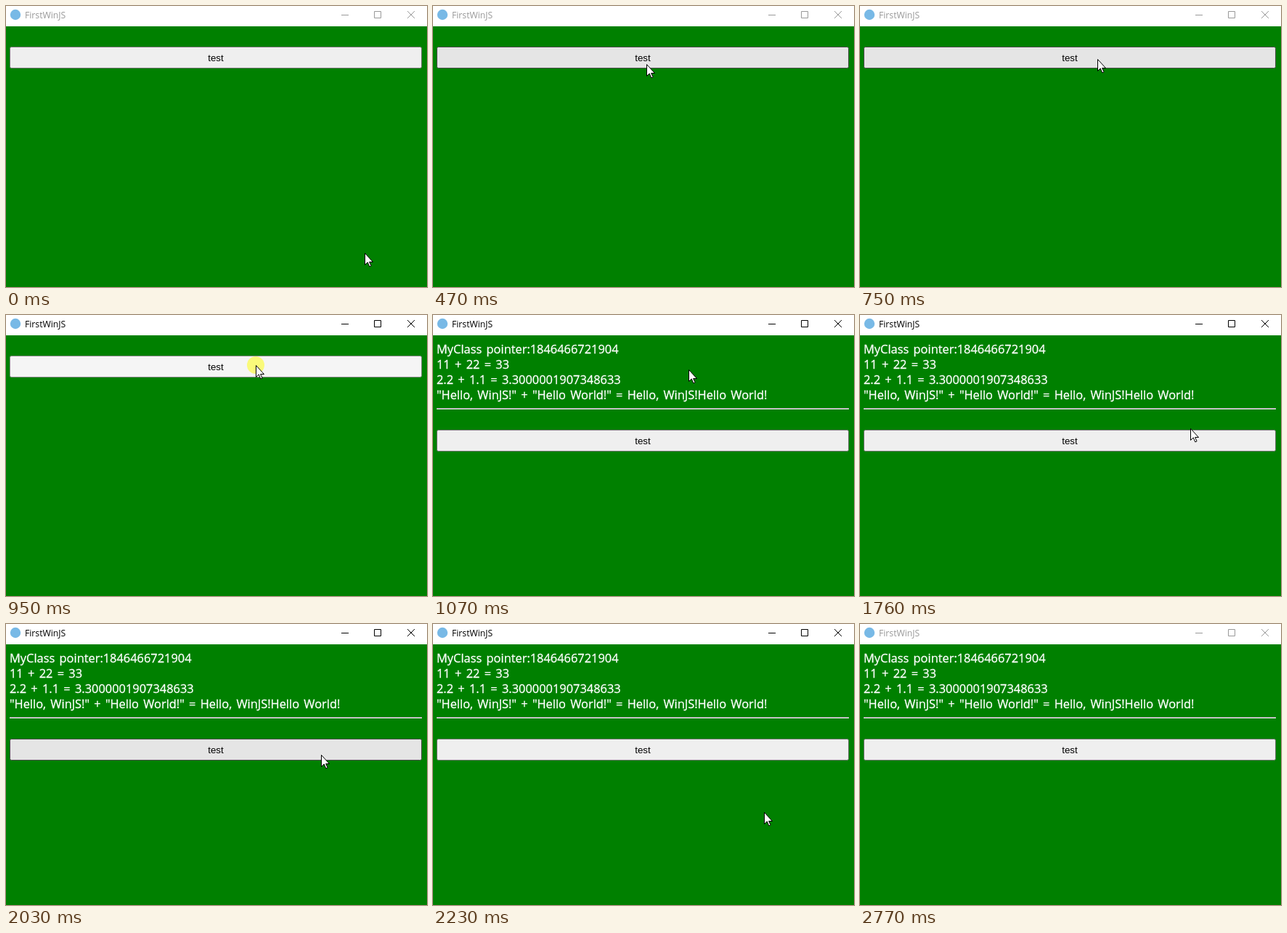
Write an HTML page that moves like this. It is 580x387 px and loops after 2860 ms.

```html
<!DOCTYPE html>
<html lang="en">
<head>
<meta charset="utf-8">
<title>FirstWinJS</title>
<style>
  html, body { margin: 0; width: 100%; height: 100%; overflow: hidden; background: #008000; }
  svg { display: block; width: 580px; height: 387px; }
  text { white-space: pre; }
  #caption { font: 12.2px "Open Sans", "Noto Sans", sans-serif; fill: currentColor; }
  #controls { fill: none; stroke: currentColor; }
  #output { font: 16.4px "Open Sans", "Noto Sans", sans-serif; word-spacing: 2px; fill: #fff; }
  #output text { stroke: #fff; stroke-width: .3px; }
  #face { fill: #efefef; stroke: #767676; }
  .hover #face { fill: #e5e5e5; stroke: #4f4f4f; }
  .active #face { fill: #f5f5f5; stroke: #8d8d8d; }
  #label { font: 13.33px "Liberation Sans", Arial, sans-serif; text-anchor: middle; }
</style>
</head>
<body>
<svg viewBox="0 0 580 387">
  <rect width="580" height="387" fill="#008000"/>
  <g id="titlebar">
    <rect width="580" height="28" fill="#fff"/>
    <circle cx="13" cy="12" r="7.2" fill="#78b9e6"/>
    <text id="caption" x="26" y="17">FirstWinJS</text>
    <path id="controls" d="M462 12.5h10M507.5 7.5h9v9h-9zM553 7l10 10M563 7l-10 10"/>
  </g>
  <g id="output">
    <text x="5" y="53">MyClass pointer:1846466721904</text>
    <text x="5" y="74">11 + 22 = 33</text>
    <text x="5" y="95">2.2 + 1.1 = 3.3000001907348633</text>
    <text x="5" y="116">"Hello, WinJS!" + "Hello World!" = Hello, WinJS!Hello World!</text>
    <path d="M5 128.5h568" stroke="#9a9a9a"/>
    <path d="M5 129.5h568" stroke="#eee"/>
  </g>
  <g id="button">
    <rect id="face" x="5.5" y=".5" width="567" height="29" rx="2"/>
    <text id="label" x="289" y="20">test</text>
  </g>
  <g id="cursor">
    <circle id="highlight" r="12" fill="#ff0" fill-opacity=".5"/>
    <path d="M.5.5v16l3.7-3.6 2.6 6 2.3-1-2.5-5.4h4.9z" fill="#fff" stroke="#000" stroke-linejoin="round"/>
  </g>
</svg>
<script>
const LOOP = 2860, TICK = 67.5;
const PRESS = 950, RELEASE = 1070, BLUR = 2770;

// Places the pointer passes; it rests there from tick "at" to tick "until".
const STOPS = [
  { at: 0, x: 494, y: 340 },
  { at: 5, x: 290, y: 134 },
  { at: 7, x: 294, y: 80 },
  { at: 13, until: 15, x: 344, y: 69 },
  { at: 16, x: 352, y: 75 },
  { at: 24, until: 27, x: 455, y: 156 },
  { at: 31, x: 427, y: 188 },
  { at: 33, x: 456, y: 259 },
  { at: 37, x: 540, y: 390 }
];

const el = id => document.getElementById(id);
const show = (id, visible) => el(id).setAttribute("visibility", visible ? "visible" : "hidden");
const move = (id, x, y) => el(id).setAttribute("transform", `translate(${x} ${y})`);

function pointerAt(tick) {
  const index = STOPS.findLastIndex(stop => stop.at <= tick);
  const from = STOPS[index], to = STOPS[index + 1] ?? from;
  const leave = from.until ?? from.at;
  const k = tick > leave && to !== from ? (tick - leave) / (to.at - leave) : 0;
  const mix = axis => Math.round(from[axis] + (to[axis] - from[axis]) * k);
  return [mix("x"), mix("y")];
}

function draw(time) {
  // The screen is sampled about 15 times a second.
  const [x, y] = pointerAt(Math.min(37, Math.floor((time + 10) / TICK)));
  const pressed = time >= PRESS && time < RELEASE;
  const done = time >= RELEASE;
  const top = done ? 158 : 56;
  const hovered = y >= top && y < top + 30;

  el("titlebar").style.color = time >= PRESS && time < BLUR ? "#000" : "#999";
  show("output", done);
  move("button", 0, top);
  el("button").setAttribute("class", pressed ? "active" : hovered ? "hover" : "");
  move("cursor", x, y);
  show("highlight", pressed);
}

const start = performance.now();
function frame() {
  draw((performance.now() - start) % LOOP);
  requestAnimationFrame(frame);
}
frame();
</script>
</body>
</html>
```
